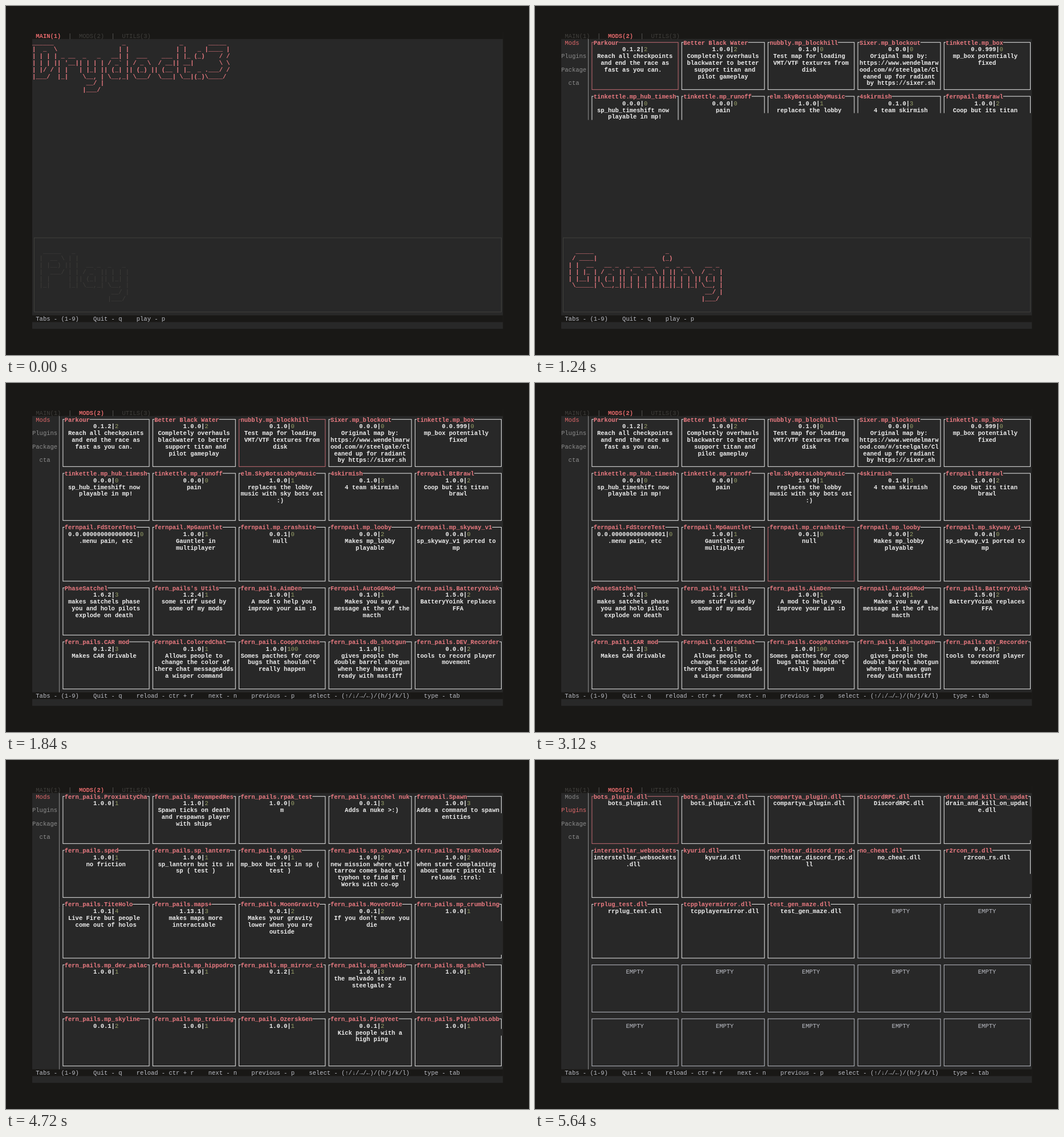
An HTML page with a canvas that plays this animation: 917x611 px, repeating every 7560 ms.

```html
<!DOCTYPE html>
<html lang="en">
<head>
<meta charset="utf-8">
<title>Terminal mod manager</title>
<style>
  html, body { margin: 0; width: 100%; height: 100%; overflow: hidden; background: #191816; }
  canvas { display: block; }
</style>
</head>
<body>
<canvas id="stage" width="917" height="611"></canvas>
<script>
const LOOP = 7560;
const W = 6.3, H = 11.8, X0 = 46, Y0 = 46, COLS = 131, ROWS = 44;
const C = {
  outer: '#191816', bg: '#282828', pink: '#ea7a81', red: '#e2696b', select: '#c46c74',
  white: '#eeeeee', line: '#eaeaea', grey: '#bcbec6', side: '#8c8c8c',
  green: '#98a068', dim: '#403f3c', bar: '#5c5b58'
};
const FONT = '10.5px "Liberation Mono", "Noto Sans Mono", monospace';
const g = document.getElementById('stage').getContext('2d');

const art = s => s.replace(/\^/g, '\x60').split('\n').slice(1);

const LOGO = art(String.raw`
______                   _               _       _____
|  _  \                 | |             | |   _ |____ |
| | | | _ __  _   _   __| |  ___    ___ | |_ (_)    / /
| | | || '__|| | | | / _^ | / _ \  / __|| __|       \ \
| |/ / | |   | |_| || (_| || (_) || (__ | |_  _ .___/ /
|___/  |_|    \__, | \__,_| \___/  \___| \__|(_)\____/
               __/ |
              |___/`);

const PLAY = art(String.raw`
 _____   _
|  __ \ | |
| |__) || |  __ _  _   _
|  ___/ | | / _^ || | | |
| |     | || (_| || |_| |
|_|     |_| \__,_| \__, |
                    __/ |
                   |___/`);

const GAMING = art(String.raw`
  _____                    _
 / ____|                  (_)
| |  __   __ _  _ __ ___   _  _ __    __ _
| | |_ | / _^ || '_ ^ _ \ | || '_ \  / _^ |
| |__| || (_| || | | | | || || | | || (_| |
 \_____| \__,_||_| |_| |_||_||_| |_| \__, |
                                      __/ |
                                     |___/`);

// One card per line: title;version;count;text, with ~ as line break and @ for the usual author
const cards = s => s.trim().split('\n').map(row => {
  const [title, version, count, text] = row.replace(/@/g, 'fern_pails.').split(';');
  return { title, version, count, lines: text ? text.split('~') : [] };
});

const PAGE1 = cards(`
Parkour;0.1.2;2;Reach all checkpoints~and end the race as~fast as you can.
Better Black Water;1.0.0;2;Completely overhauls~blackwater to better~support titan and~pilot gameplay
nubbly.mp_blockhill;0.1.0;0;Test map for loading~VMT/VTF textures from~disk
Sixer.mp_blockout;0.0.0;0;Original map by:~https://www.wendelmarw~ood.com/#/steelgale/Cl~eaned up for radiant~by https://sixer.sh
tinkettle.mp_box;0.0.999;0;mp_box potentially~fixed
tinkettle.mp_hub_timesh;0.0.0;0;sp_hub_timeshift now~playable in mp!
tinkettle.mp_runoff;0.0.0;0;pain
elm.SkyBotsLobbyMusic;1.0.0;1;replaces the lobby~music with sky bots ost~:)
4skirmish;0.1.0;3;4 team skirmish
fernpail.BtBrawl;1.0.0;2;Coop but its titan~brawl
fernpail.FdStoreTest;0.0.000000000000001;0;.menu pain, etc
fernpail.MpGauntlet;1.0.0;1;Gauntlet in~multiplayer
fernpail.mp_crashsite;0.0.1;0;null
fernpail.mp_looby;0.0.0;2;Makes mp_lobby~playable
fernpail.mp_skyway_v1;0.0.a;0;sp_skyway_v1 ported to~mp
PhaseSatchel;1.6.2;3;makes satchels phase~you and holo pilots~explode on death
fern_pails's Utils;1.2.4;1;some stuff used by~some of my mods
@AimDen;1.0.0;1;A mod to help you~improve your aim :D
Fernpail.AutoGGMod;0.1.0;1;Makes you say a~message at the of the~macth
@BatteryYoink;1.5.0;2;BatteryYoink replaces~FFA
@CAR mod;0.1.2;3;Makes CAR drivable
Fernpail.ColoredChat;0.1.0;1;Allows people to~change the color of~there chat messageAdds~a wisper command
@CoopPatches;1.0.0;100;Somes pacthes for coop~bugs that shouldn't~really happen
@db_shotgun;1.1.0;1;gives people the~double barrel shotgun~when they have gun~ready with mastiff
@DEV_Recorder;0.0.0;2;tools to record player~movement`);

const PAGE2 = cards(`
@DropshipDriv;1.5.3;2;Makes dropships~drivable
fernpail.emojis;0.1.0;1;adds cut emoji uwu
@FactionLobby;owo;2;Adds the faction leader~to your lobby ( next to~you )
Free  All Achievements;free;2;Free  All Achievements~Unlocked For You
@Furnace;1.1.0;5
GunYeet;1.0.1;3;Hold down USE to throw~your gun
@HoloMimic;0.1.2;4;holos mimic your~movement
@IniquityFact;1.0.0;4
@Intro Mod;0.0.1;0;custom intro for~pilots
Kraber_to_mp_box;1.0.0;4;if you die from a~kraber you are sent to~mp_box
@LiveHolo;1.0.1;4;Live Fire but people~come out of holos
@maps+;1.13.1;3;makes maps more~interactable
@MoonGravity;0.0.1;2;Makes your gravity~lower when you are~outside
@MoveOrDie;0.0.1;2;If you don't move you~die
@mp_crumbling;1.0.0;1
@mp_dev_palac;1.0.0;1
@mp_hippodro;1.0.0;1
@mp_mirror_ci;0.1.2;1
@mp_melvado;1.0.0;3;the melvado store in~steelgale 2
@mp_sahel;1.0.0;1
@mp_skyline;0.0.1;2
@mp_training;1.0.0;1
@OzerskGen;1.0.0;1
@PingYeet;0.0.1;2;Kick people with a~high ping
@PlayableLobb;1.0.0;1`);

const PAGE3 = cards(`
@ProximityCha;1.0.0;1
@RevampedRes;1.1.0;2;Spawn ticks on death~and respawns player~with ships
@rpak_test;1.0.0;0;m
@satchel nuk;0.0.1;3;Adds a nuke >:)
fernpail.Spawn;1.0.0;3;Adds a command to spawn~entities
@sped;1.0.0;1;no friction
@sp_lantern;1.0.0;1;sp_lantern but its in~sp ( test )
@sp_box;1.0.0;1;mp_box but its in sp (~test )
@sp_skyway_v;1.0.0;2;new mission where wilf~tarrow comes back to~typhon to find BT |~Works with co-op
@TearsReloadO;1.0.0;2;when start complaining~about smart pistol it~reloads :trol:
@TitleCards;1.0.0;1
@TitanPing;1.0.0;2;ping for titans
@TripleJump;0.1.0;1;one more jump
@TurretKit;1.0.0;1
@UiTest;0.0.1;0
@Vanish;1.0.0;1
@VoteMap;1.0.0;2;vote for a map
@WallTest;0.0.1;1
@WaveCoop;1.0.0;1
@WeaponSwap;1.0.0;2
@Wings;0.1.0;1
@XpFix;1.0.0;1
@Yoink;1.0.0;1
@ZipTest;0.0.1;1
@ZoomMod;1.0.0;1`);

const PLUGINS = 'bots_plugin bots_plugin_v2 compartya_plugin DiscordRPC drain_and_kill_on_update interstellar_websockets kyurid northstar_discord_rpc no_cheat r2rcon_rs rrplug_test tcpplayermirror test_gen_maze'
  .split(' ').map(name => {
    const file = name + '.dll';
    return { title: file, lines: file.match(/.{1,23}/g) };
  });

const KEYS = 'Tabs - (1-9)    Quit - q    ';
const HOME_KEYS = KEYS + 'play - p';
const MOD_KEYS = KEYS + 'reload - ctr + r    next - n    previous - p    select - (↑/↓/→/←)/(h/j/k/l)    type - tab';

// Grid edges of the cards: [first, last] cell
const CARD_X = [[8, 32], [33, 56], [57, 81], [82, 105], [106, 130]];
const CARD_Y = [[1, 8], [9, 16], [17, 25], [26, 33], [34, 41]];

function fill(col, row, cols, rows, color) {
  g.fillStyle = color;
  g.fillRect(X0 + col * W, Y0 + row * H, cols * W, rows * H);
}

function text(s, col, row, color, bold) {
  g.font = (bold ? 'bold ' : '') + FONT;
  g.fillStyle = color;
  g.fillText(s, X0 + col * W, Y0 + row * H + 9.8);
}

const midX = col => X0 + (col + 0.55) * W;
const midY = row => Y0 + (row + 0.5) * H;

function box(x1, y1, x2, y2, color) {
  g.strokeStyle = color;
  g.strokeRect(midX(x1), midY(y1), midX(x2) - midX(x1), midY(y2) - midY(y1));
}

function card(item, i, selected) {
  const [x1, x2] = CARD_X[i % 5], [y1, y2] = CARD_Y[Math.floor(i / 5)];
  const inner = x2 - x1 - 1;
  const start = s => x1 + 1 + Math.floor(inner / 2) - Math.floor(s.length / 2);
  box(x1, y1, x2, y2, selected ? C.select : item ? C.line : C.grey);
  if (!item) {
    text('EMPTY', start('EMPTY'), y1 + 1, C.grey);
    return;
  }
  const title = item.title.slice(0, inner);
  fill(x1 + 1, y1, title.length, 1, C.bg);
  text(title, x1 + 1, y1, C.pink, true);
  let row = y1 + 1;
  if (item.version) {
    const head = item.version + '|', col = start(head + item.count);
    text(head, col, row, C.white, true);
    text(item.count, col + head.length, row++, C.green);
  }
  for (const s of item.lines) text(s, start(s), row++, C.white, true);
}

function frame(tab, keys) {
  fill(0, 0, COLS, ROWS, C.bg);
  fill(0, 0, COLS, 1, C.outer);
  fill(0, 42, COLS, 1, C.outer);
  ['MAIN(1)', 'MODS(2)', 'UTILS(3)'].forEach((s, i) => {
    text(s, 1 + 12 * i, 0, i === tab ? C.red : C.dim, i === tab);
    if (i) text('|', 12 * i - 2, 0, C.bar);
  });
  text(keys, 1, 42, C.grey);
}

const home = (banner, color, bold) => () => {
  frame(0, HOME_KEYS);
  LOGO.forEach((s, i) => text(s, 0, 1 + i, C.pink, true));
  box(0, 30, 130, 41, C.dim);
  banner.forEach((s, i) => text(s, 2, 32 + i, color, bold));
};

// gaps: [first, end) rows where the rightmost border is not painted
const list = (items, kind, selected, gaps = []) => () => {
  frame(1, MOD_KEYS);
  ['Mods', 'Plugins', 'Package', 'cta'].forEach((s, i) =>
    text(s, [1, 0, 0, 2][i], 1 + 2 * i, i === kind ? C.red : C.side));
  fill(7.45, 1, 0.16, 41, C.side);
  for (let i = 0; i < 25; i++) card(items[i], i, i === selected);
  for (const [from, to] of gaps) fill(130, from, 1, to - from, C.bg);
};

const cell = (row, col = 0) => row * COLS + col;
const mods = selected => list(PAGE1, 0, selected);
const first = mods(0), down = mods(7);
const page2 = list(PAGE2, 0, -1, [[13, 16], [20, 25], [36, 37]]);
const page3 = list(PAGE3, 0, -1, [[4, 8], [13, 16], [20, 25], [36, 37]]);
const plugins = list(PLUGINS, 1, 0, [[3, 8], [13, 16]]);

// [start in ms, screen, cells repainted so far (all when absent)]
const STEPS = [
  [0, home(PLAY, C.dim, false)],
  [360, home(GAMING, C.pink, true)],
  [1240, first, cell(12, 40)],
  [1280, first, cell(23, 60)],
  [1320, first, cell(34, 60)],
  [1360, first],
  [1440, mods(1)],
  [1840, mods(2)],
  [2680, down, cell(12, 60)],
  [2720, down],
  [3120, mods(12)],
  [4400, page2, cell(20, 81)],
  [4440, page2],
  [4720, page3, cell(17, 23)],
  [4760, page3],
  [5520, plugins, cell(10, 60)],
  [5560, plugins, cell(20, 60)],
  [5600, plugins, cell(31, 60)],
  [5640, plugins]
];

function paint(n) {
  const [, screen, cut] = STEPS[n];
  g.fillStyle = C.outer;
  g.fillRect(0, 0, 917, 611);
  if (!cut) {
    screen();
    return;
  }
  let before = n;
  while (STEPS[before][2]) before--;
  STEPS[before][1]();
  const row = Math.floor(cut / COLS);
  g.save();
  g.beginPath();
  g.rect(X0, Y0, COLS * W, row * H);
  g.rect(X0, Y0 + row * H, (cut % COLS) * W, H);
  g.clip();
  screen();
  g.restore();
}

const begin = performance.now();
let shown = -1;
function tick(now) {
  const t = Math.max(0, now - begin) % LOOP;
  const n = STEPS.findLastIndex(step => step[0] <= t);
  if (n !== shown) paint(shown = n);
  requestAnimationFrame(tick);
}
tick(begin);
</script>
</body>
</html>
```
